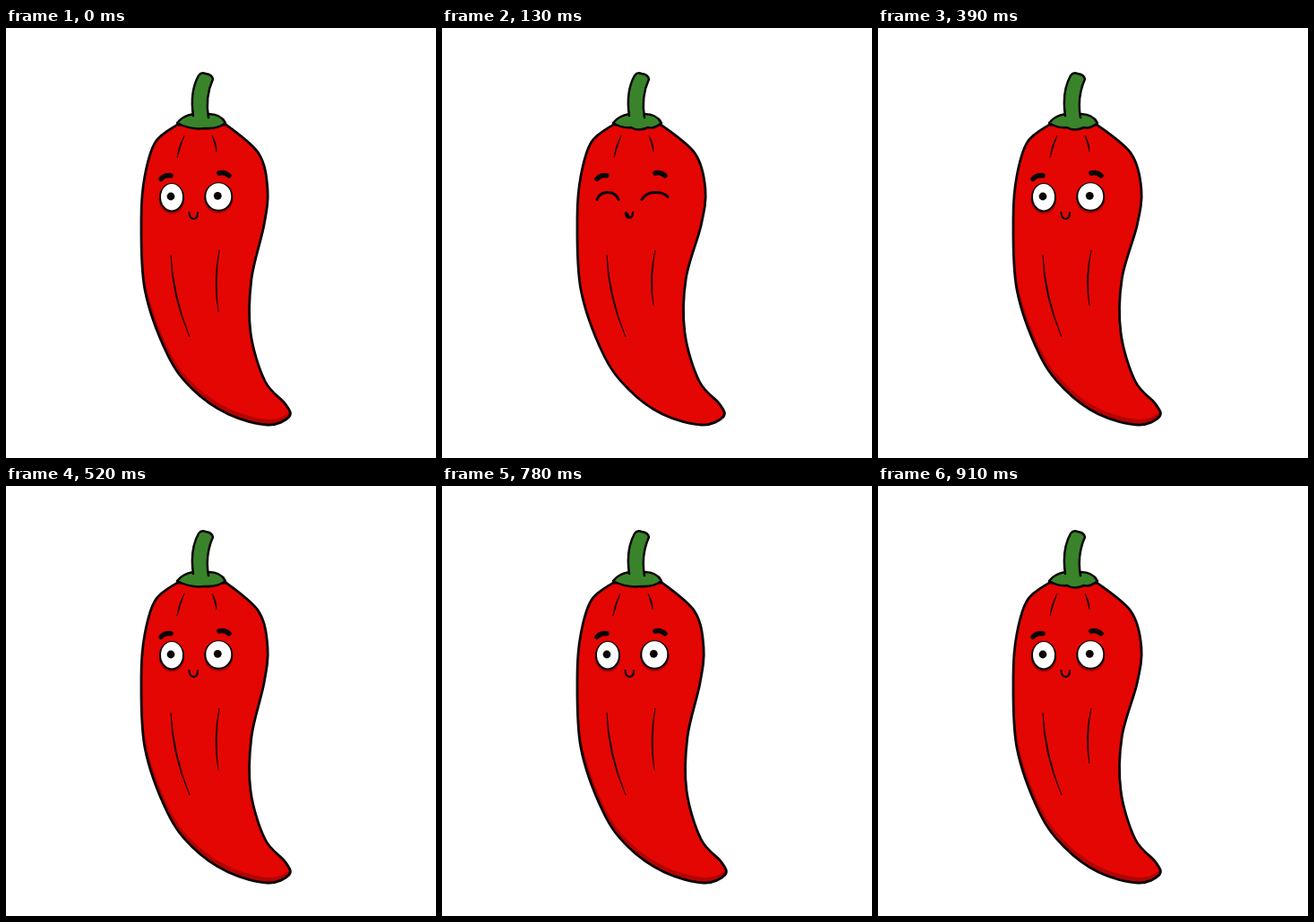
An HTML page that plays this animation: 480x480 px, repeating every 1040 ms.

```html
<!DOCTYPE html>
<html lang="en">
<head>
<meta charset="utf-8">
<title>Chili pepper</title>
<style>
  html, body { margin: 0; width: 100%; height: 100%; overflow: hidden; background: #fff; }
  svg { display: block; width: 100vw; height: 100vh; }
  .line { fill: none; stroke: #0a0404; stroke-linecap: round; stroke-linejoin: round; }
  .ink { fill: #0a0404; stroke: #0a0404; stroke-width: .6; stroke-linejoin: round; }
</style>
</head>
<body>
<svg id="stage" viewBox="0 0 480 480"></svg>
<script>
const STEP = 130, BLINK = 1, COUNT = 8;
const RED = '#e40602', SHADE = '#b00504', GREEN = '#39842b', INK = '#0a0404';
const stage = document.getElementById('stage');

// Key points of the outline, counter-clockwise from the leaf
const outline = [[191,108],[167,127],[155,165],[151,212],[155,292],[180,364],[208,403],[248,431],
  [292,443],[316,434],[312,420],[289,394],[273,340],[274,280],[288,220],[292,180],[282,140],[246,108]];

// The second drawing swells at the right shoulder and narrows below it
function swell([x, y]) {
  return x < 240 ? [x, y] : [x + 2 * Math.cos(Math.PI * Math.min(1, (y - 188) / 110)), y];
}

// Smooth curve through points
function spline(p) {
  let d = `M${p[0]}`;
  for (let i = 0; i < p.length - 1; i++) {
    const a = p[i - 1] || p[i], b = p[i], c = p[i + 1], e = p[i + 2] || c;
    const ctrl = (q, from, to, k) => [q[0] + (to[0] - from[0]) * k, q[1] + (to[1] - from[1]) * k];
    d += `C${ctrl(b, a, c, 1 / 6)} ${ctrl(c, b, e, -1 / 6)} ${c}`;
  }
  return d + 'Z';
}

const fill = (d, color, extra = '') => `<path d="${d}" fill="${color}" ${extra}/>`;
const line = (d, width) => `<path class="line" d="${d}" stroke-width="${width}"/>`;
const arc = (x, y, w, h) => `M${x} ${y} q${w * .12} ${-h} ${w / 2} ${-h} t${w / 2} ${h}`;
const oval = (x, y, rx, ry, color) => `<ellipse cx="${x}" cy="${y}" rx="${rx}" ry="${ry}" fill="${color}"/>`;

// A fold: a sliver tapering at both ends, bowed to the left
function fold(x, y, dx, dy, bow) {
  const mid = k => `${x + dx / 2 - bow + k} ${y + dy / 2}`;
  return `<path class="ink" d="M${x} ${y}Q${mid(-1)} ${x + dx} ${y + dy}Q${mid(1.6)} ${x} ${y}"/>`;
}

function eye(x, y, rx) {
  return oval(x, y + 2.6, rx + 1.2, 16.5, SHADE) + oval(x, y + .5, rx + 1, 16.3, INK) +
    oval(x, y, rx - 1, 14.7, '#fff') + oval(x - 1, y - .7, 4.4, 4.4, INK);
}

function face(wide, smiling) {
  const brows = line('M173 168.5 Q177 164 184 164.7', 5.5) + line('M238 162 Q244 160.5 249 164.8', 5.5);
  if (!smiling) {
    return brows + eye(185, 188.7, 13) + eye(237.3, 188, 15) + line('M204.5 206 q.5 7 5 7 t4.5 -7', 2.2);
  }
  return brows + line('M173 191.5 q3 -8 12 -8 t12 8', 3) + line('M223 191.5 q5 -8 15 -8 t14 5', 3) +
    line('M205.3 206 q-.3 6 3.7 6 t4 -6', 2.3) + line('M205.7 207 l2.8 4', 3.4);
}

function stalk(wide) {
  const hem = wide ? 'Q237 113 230 111 Q219 116 211 111 Q200 112 191 106' : 'Q236 113 222 112 Q206 114 191 106';
  const leaf = `M191 106 Q197 98 209 96 H226 Q240 96 245 106 ${hem}Z`;
  const stem = `M209 98 Q205 71 215 53 Q218 49 223 51 Q230 52 231 57 Q222 77 226 100`;
  return fill(leaf, GREEN) + line(leaf, 2.5) + fill(stem + 'L217 103Z', GREEN) + line(stem, 2.5);
}

function pepper(id, wide, smiling) {
  const body = spline(wide ? outline.map(swell) : outline), clip = `clip-${id}`;
  const lift = smiling ? '0' : '1.2 -6';
  return `<g id="${id}" visibility="hidden">
    <clipPath id="${clip}"><path d="${body}"/></clipPath>
    ${fill(body, SHADE)}
    <g clip-path="url(#${clip})">${fill(body, RED, `transform="translate(${lift})"`)}</g>
    ${line(body, 2.8)}
    ${fold(199 + wide, 120, -8, 25, 2)}${fold(230 + wide, 120, 5, 18, -1.5)}
    ${fold(184, 253, 21, 92, 9)}${fold(238, 248, wide ? -2 : -1, wide ? 62 : 69, 6)}
    ${stalk(wide)}
    ${face(wide, smiling)}
  </g>`;
}

stage.innerHTML = pepper('tall', 0, false) + pepper('wide', 1, false) + pepper('smile', 1, true);
const poses = [...stage.children];

// The two drawings alternate; the eyes close on one beat of the loop
function poseAt(t) {
  const beat = Math.floor(t / STEP) % COUNT;
  if (beat === BLINK) return 'smile';
  return beat % 2 ? 'wide' : 'tall';
}

const start = performance.now();
function draw(now) {
  const id = poseAt(Math.max(0, now - start));
  for (const g of poses) g.setAttribute('visibility', g.id === id ? 'visible' : 'hidden');
  requestAnimationFrame(draw);
}
draw(start);
</script>
</body>
</html>
```
